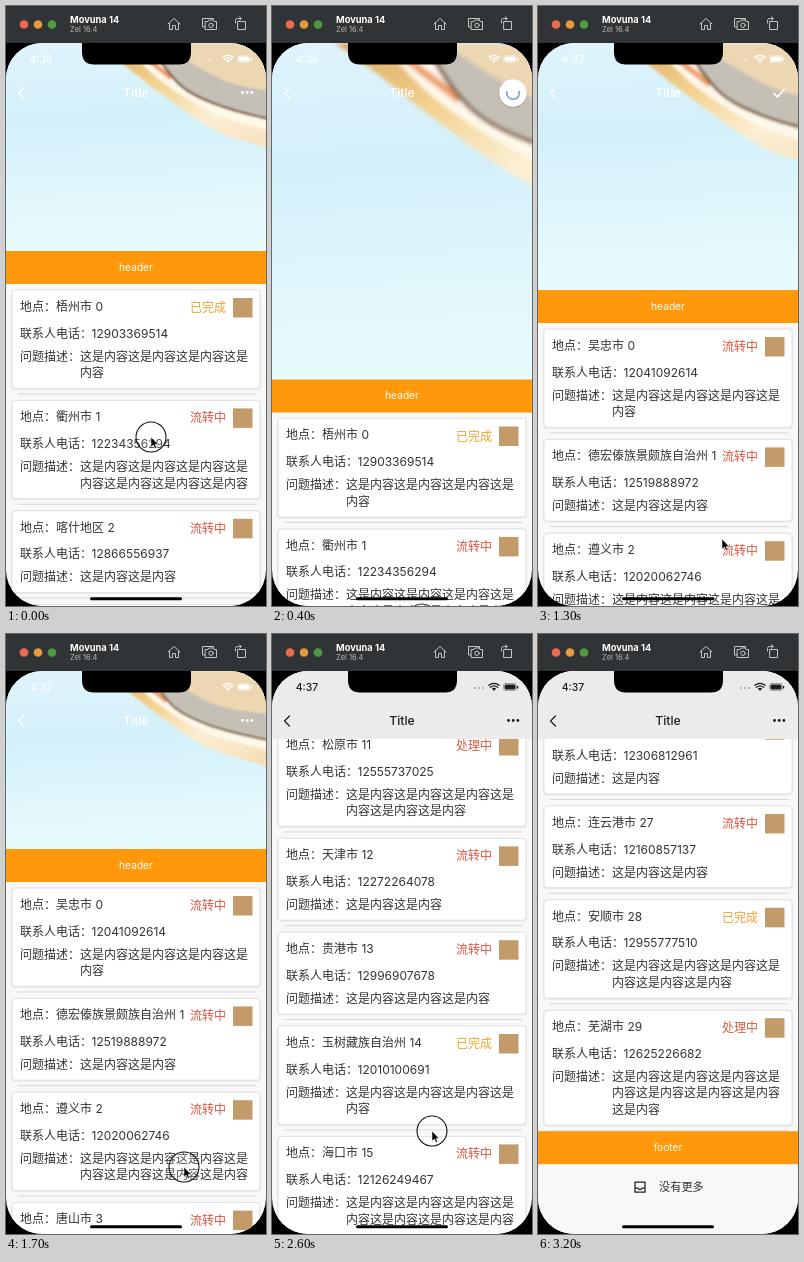
Write an HTML page that moves like this. It is 260 px wide and 600 px high and loops after 3.3 s.

```html
<!DOCTYPE html>
<html lang="zh">
<head>
<meta charset="utf-8">
<style>
html, body { margin: 0; width: 100%; height: 100%; overflow: hidden; background: #000; }
svg { display: block; width: 260px; height: 600px; }
text { font-family: Inter, "Noto Sans CJK SC", "Noto Sans CJK", sans-serif; font-size: 12px; fill: #333; }
.mid { text-anchor: middle; }
.line { fill: none; stroke-linecap: round; stroke-linejoin: round; }
</style>
</head>
<body>
<svg viewBox="0 0 260 600">
  <defs>
    <clipPath id="screen"><rect y="37" width="260" height="563" rx="36"/></clipPath>
    <clipPath id="photoClip"><rect id="photoBox" y="37" width="260"/></clipPath>
    <linearGradient id="sky" x1="0" y1="0" x2=".1" y2="1">
      <stop offset="0" stop-color="#e0f4fb"/><stop offset=".4" stop-color="#d3f0fa"/><stop offset="1" stop-color="#e8fbfc"/>
    </linearGradient>
    <linearGradient id="band" x1="0" y1="0" x2="1" y2="1">
      <stop offset="0" stop-color="#d6a65e"/><stop offset=".3" stop-color="#f3d08c"/><stop offset=".6" stop-color="#fcefd4"/><stop offset="1" stop-color="#f3d9b0"/>
    </linearGradient>
    <filter id="soft"><feGaussianBlur stdDeviation=".006"/></filter>
  </defs>

  <g clip-path="url(#screen)">
    <rect y="37" width="260" height="563" fill="#f8f8f8"/>
    <g clip-path="url(#photoClip)">
      <g id="photo">
        <rect x="-1" width="2" height="1" fill="url(#sky)"/>
        <g filter="url(#soft)">
          <path d="M-.2 0C-.14 .04 -.1 .07 -.05 .11S.05 .19 .13 .25S.29 .37 .38 .42S.55 .47 .8 .56V0Z" fill="url(#band)"/>
          <path d="M-.06 0C0 .07 .06 .14 .13 .19S.3 .31 .4 .35S.6 .41 .8 .46V0Z" fill="#fef8e9"/>
          <path d="M-.02 .02C.05 .08 .1 .11 .17 .17" fill="none" stroke="#ee9d6b" stroke-width=".022"/>
          <path d="M.07 0C.11 .08 .15 .14 .2 .19S.32 .27 .4 .3S.6 .36 .8 .4V0Z" fill="#c4c0b6"/>
          <path d="M.07 0C.11 .08 .15 .14 .2 .19S.32 .27 .4 .3S.6 .36 .8 .4" fill="none" stroke="#7a5a3e" stroke-width=".012"/>
          <path d="M.13 0C.2 .06 .3 .12 .4 .17S.6 .22 .8 .25V0Z" fill="#ecd7b2"/>
        </g>
      </g>
    </g>
    <g id="list">
      <rect y="-33" width="260" height="33" fill="#ff980a"/>
      <text class="mid" x="130" y="-13.200" style="font-size:10.200px;fill:#fff">header</text>
      <g id="before"></g>
      <g id="after"></g>
    </g>
    <rect id="bar" y="37" width="260" height="68" fill="#ebebeb"/>
    <path d="M76 36H185V46Q185 58.500 173 58.500H88Q76 58.500 76 46Z" fill="#000"/>
    <g id="chrome">
      <text id="clock" class="mid" x="35" y="56.500" style="font-size:10.400px;font-weight:500;fill:inherit"></text>
      <text class="mid" x="130" y="91.300" style="font-size:12.200px;font-weight:500;fill:inherit">Title</text>
      <g stroke="none">
        <g opacity=".3"><circle cx="203" cy="54" r="1.100"/><circle cx="207" cy="54" r="1.100"/><circle cx="211" cy="54" r="1.100"/></g>
        <rect x="232.500" y="50.500" width="11" height="5" rx="1.500"/><rect x="245" y="52" width="1.200" height="2.500"/>
        <path d="M222 57L219.800 54.600Q222 53 224.200 54.600Z"/>
      </g>
      <g class="line">
        <rect x="231.500" y="49.500" width="13" height="7" rx="2" stroke-width=".6" opacity=".6"/>
        <path d="M218.300 53.300Q222 50.300 225.700 53.300M216.800 51.300Q222 47.300 227.200 51.300" stroke-width="1.200"/>
        <path d="M17.500 82L12.500 87L17.500 92" stroke-width="1.200"/>
      </g>
      <g id="dots" stroke="none"><circle cx="236.500" cy="86.500" r="1.400"/><circle cx="241.200" cy="86.500" r="1.400"/><circle cx="245.900" cy="86.500" r="1.400"/></g>
      <path id="check" class="line" d="M236 87.500L239.500 91L246 83.500" stroke-width="1.700"/>
    </g>
    <g id="spinner">
      <circle r="14.300" cy="1" opacity=".12"/><circle r="13.700" fill="#fff"/>
      <circle id="arc" class="line" r="6.300" pathLength="100" stroke="#6b9ddb" stroke-width="1.500"/>
    </g>
    <rect x="84" y="591.300" width="92" height="3" rx="1.500"/>
  </g>

  <g id="pointer">
    <circle id="touch" r="15" fill="#fff" fill-opacity=".15" stroke="#111" stroke-width="1.100"/>
    <path d="M0 0V10L2.300 8L4 11.500L5.500 10.800L4 7.400H7Z" stroke="#fff" stroke-width=".5"/>
  </g>

  <rect width="260" height="37" fill="#313436"/>
  <circle cx="18" cy="18.500" r="4.300" fill="#ec6a4f"/><circle cx="32" cy="18.500" r="4.300" fill="#e59a3c"/><circle cx="46" cy="18.500" r="4.300" fill="#4f9b43"/>
  <text x="64" y="17" style="font-size:9.300px;font-weight:700;fill:#fff">Movuna 14</text>
  <text x="64" y="26" style="font-size:7.500px;fill:#b4b6b7">Zel 16.4</text>
  <g class="line" stroke="#c3c5c6" stroke-width="1">
    <path d="M162 18L168 12.500L174 18M163.500 17V23.500H166.500V19.500H169.500V23.500H172.500V17"/>
    <path d="M199 21H196.500V12.500H207.500V14M199.500 15.500H202L203 14H207L208 15.500H210.500V23.500H199.500Z"/><circle cx="205" cy="19.300" r="2.200"/>
    <path d="M232 15.500H239.500V23.500H232ZM229.500 17V14.500Q229.500 12.500 231.500 12.500H235M233.500 10.800L235.300 12.500L233.500 14.200"/>
  </g>
</svg>
<script>
const $ = id => document.getElementById(id);
const LOOP = 3300, STEP = 100, LINE = 16.6, PER_LINE = 14;
const STATES = [["已完成", "#f3a02e"], ["流转中", "#e0523e"], ["处理中", "#da5a3b"]];

let seed = 7;
const random = () => (seed = seed * 16807 % 2147483647) / 2147483647;
const pick = n => Math.floor(random() * n);
const phone = () => "12" + Array.from({ length: 9 }, () => pick(10)).join("");
const text = (x, y, s, fill = "") => `<text x="${x}" y="${y + 4.3}"${fill && ` style="fill:${fill}"`}>${s}</text>`;

// Each row: [place, state, repeats of the phrase]
const firstRows = [["梧州市", 0, 4], ["衢州市", 1, 7], ["喀什地区", 1, 2], ["宜昌市", 1, 3]];
const known = {
  0: ["吴忠市", 1, 4], 1: ["德宏傣族景颇族自治州", 1, 2], 2: ["遵义市", 1, 7], 3: ["唐山市", 1, 2], 4: ["北京市", 1, 3],
  11: ["松原市", 2, 6], 12: ["天津市", 1, 2], 13: ["贵港市", 1, 3], 14: ["玉树藏族自治州", 0, 4], 15: ["海口市", 1, 7],
  26: ["绍兴市", 1, 1], 27: ["连云港市", 1, 2], 28: ["安顺市", 0, 6], 29: ["芜湖市", 2, 8]
};
const cities = ["丽水市", "襄阳市", "柳州市", "大同市", "泉州市", "洛阳市", "桂林市", "宝鸡市"];
const rows = Array.from({ length: 30 }, (_, i) => known[i] || [cities[pick(cities.length)], pick(3), 1 + pick(8)]);

function card([place, state, repeats], i, top) {
  const words = "这是内容".repeat(repeats).match(new RegExp(`.{1,${PER_LINE}}`, "g"));
  const height = 65.2 + words.length * LINE;
  const [label, color] = STATES[state];
  const svg = `<g transform="translate(0 ${top})">
    <rect x="5" y="5.500" width="250" height="${height + 2}" rx="4" fill="#000" opacity=".06"/>
    <rect x="6" y="6" width="248" height="${height}" rx="3" fill="#fff" stroke="#dedee0" stroke-width=".9"/>
    ${text(14, 22.6, `地点：${place} ${i}`)}${text(184, 23.7, label, color)}
    <rect x="227" y="14" width="19.500" height="19.500" fill="#c39a69"/>
    ${text(14, 49.2, "联系人电话：")}${text(85.5, 49.2, phone())}${text(14, 72.3, "问题描述：")}
    ${words.map((w, n) => text(74, 72.3 + n * LINE, w)).join("")}
    <path d="M12 ${height + 11.5}H250" stroke="#cfcfd2" stroke-width=".8"/></g>`;
  return { svg, pitch: height + 12 };
}

function fill(group, items) {
  let top = 0;
  const tops = [];
  group.innerHTML = items.map((row, i) => {
    const { svg, pitch } = card(row, i, top);
    tops.push(top);
    top += pitch;
    return svg;
  }).join("");
  return [...tops, top];
}

fill($("before"), firstRows);
const tops = fill($("after"), rows);
$("after").innerHTML += `<g transform="translate(0 ${tops[30]})">
  <rect width="260" height="110" fill="#f8f8f8"/><rect width="260" height="33" fill="#ff980a"/>
  <text class="mid" x="130" y="19.600" style="font-size:10.200px;fill:#fff">footer</text>
  <path class="line" d="M97 51H107V61H97ZM97 57H100Q102 60 104 57H107" stroke="#222" stroke-width="1.300"/>
  <text x="121" y="60" style="font-size:11.200px">没有更多</text></g>`;

const clamp = v => Math.max(0, Math.min(1, v));
const linear = p => p, out = p => 1 - (1 - p) ** 3, inOut = p => p * p * (3 - 2 * p), outSoft = p => 1 - (1 - p) ** 2;

// Keys: [time, value, easing towards this key]
function at(keys, t) {
  const i = keys.findIndex(k => k[0] > t);
  if (i < 0) return keys[keys.length - 1][1];
  if (i === 0) return keys[0][1];
  const [t0, a] = keys[i - 1], [t1, b, ease = linear] = keys[i];
  return a + (b - a) * ease((t - t0) / (t1 - t0));
}

const midway = 88 - tops[11], end = 166 - tops[27];
const scroll = [[0, 278], [400, 406.5, outSoft], [700, 317.7, inOut], [1300, 317], [1400, 317], [1600, 248, inOut],
  [1700, 248], [2100, 85, inOut], [2600, midway, outSoft], [2700, midway - 140], [3150, end, outSoft]];
const pointerX = [[0, 145], [400, 150], [1200, 190], [1300, 184], [1700, 178], [2050, 161], [2600, 160]];
const pointerY = [[0, 431], [400, 613], [700, 650], [1200, 640], [1300, 533], [1700, 533], [2050, 361, inOut],
  [2250, 361], [2500, 497, inOut], [2600, 497], [2700, 350], [3000, 330]];
const within = (t, a, b) => t >= a && t < b;
const show = (id, on) => $(id).setAttribute("visibility", on ? "visible" : "hidden");
const set = (id, name, value) => $(id).setAttribute(name, value);

function draw(t) {
  const y = at(scroll, t), height = Math.max(178, y - 70), cover = clamp((248 - y) / 110);
  set("list", "transform", `translate(0 ${y})`);
  set("photoBox", "height", Math.max(0, y - 70));
  set("photo", "transform", `translate(130 37) scale(${height})`);
  set("bar", "opacity", cover);

  const ink = cover > .5 ? "#1c1c1c" : "#fff";
  set("chrome", "fill", ink);
  document.querySelectorAll("#chrome .line").forEach(e => e.setAttribute("stroke", ink));
  $("check").setAttribute("fill", "none");
  $("clock").textContent = t < 1000 ? "4:36" : "4:37";

  const refreshed = t >= 1200;
  show("before", !refreshed);
  show("after", refreshed);
  show("check", within(t, 1200, 1600));
  show("dots", t < 100 || t >= 1600);
  show("spinner", within(t, 100, 1200));
  set("spinner", "transform", `translate(241 87) scale(${out(clamp(t / 250))})`);
  const sweep = 2 + 56 * Math.sin(Math.PI * (t - 700) / 600) ** 2;
  set("arc", "stroke-dasharray", `${sweep} 100`);
  set("arc", "transform", `rotate(${-90 + (t - 700) * .95})`);

  show("pointer", t < 3000);
  set("pointer", "transform", `translate(${at(pointerX, t)} ${at(pointerY, t)})`);
  set("touch", "opacity", t <= 400 || within(t, 1700, 2050) || within(t, 2550, 2750) ? 1 : 0);
}

const start = performance.now();
function tick() {
  const t = (performance.now() - start + 4) % LOOP;
  draw(Math.floor(t / STEP) * STEP);
  requestAnimationFrame(tick);
}
tick();
</script>
</body>
</html>
```
